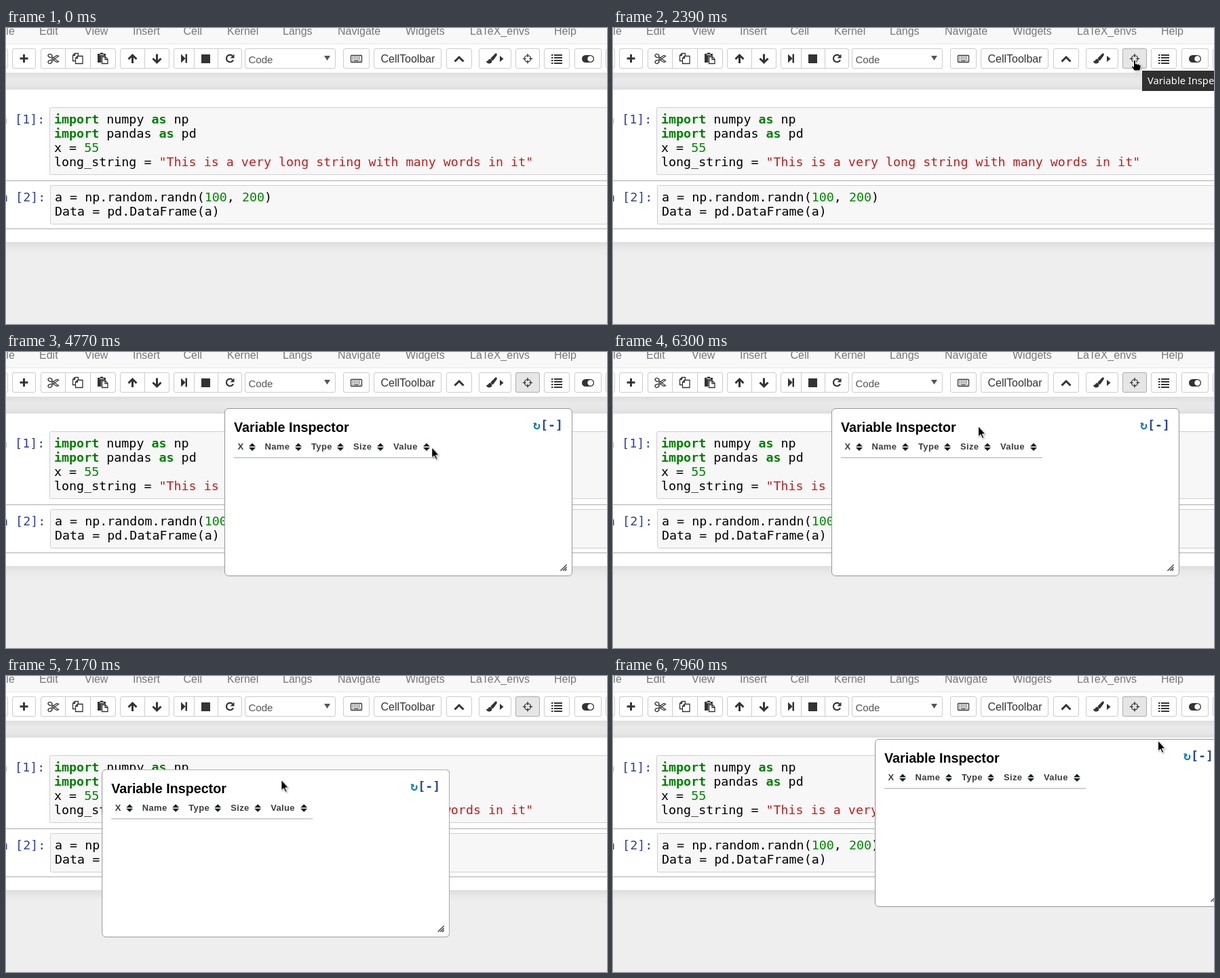
Recreate the animation shown at these times as an HTML page. Size 886x437 px, loop 8 s.

```html
<!DOCTYPE html>
<html lang="en">
<head>
<meta charset="utf-8">
<title>Notebook variable inspector</title>
<style>
html, body { margin: 0; width: 100%; height: 100%; overflow: hidden; background: #eee; }
.stage { position: relative; width: 886px; height: 437px; overflow: hidden; background: #eee; }
.stage > * { position: absolute; }
.sheet { left: -30px; right: -30px; background: #fff; box-shadow: 0 0 16px 1px rgba(87, 87, 87, .2); }
.header { top: -10px; height: 76px; }
.notebook { top: 91px; height: 225px; }
svg { left: 0; top: 0; display: block; overflow: visible; }
text { white-space: pre; }

.menu { font: 16px "Liberation Sans", Arial, sans-serif; fill: #777; }
.label { font: 16px "Liberation Sans", Arial, sans-serif; fill: #333; }
.code { font: 18.33px "DejaVu Sans Mono", monospace; fill: #000; }
.prompt { fill: #303f9f; }
.key { fill: #008000; font-weight: bold; }
.num { fill: #008800; }
.str { fill: #ba2121; }
.box { fill: #f7f7f7; stroke: #cfcfcf; }
.btn { fill: #fff; stroke: #ccc; }
.icon { fill: #333; }
.line { fill: none; stroke: #333; stroke-width: 1.3; }
.bold { fill: none; stroke: #333; stroke-width: 3; }

.panel { left: 0; top: 0; width: 513px; height: 248px; box-sizing: border-box; overflow: hidden;
  background: #fff; border: 1px solid #959595; border-radius: 6px;
  animation: drag 8s linear infinite, grow 8s linear infinite; }
.panel svg { position: absolute; left: -1px; top: -1px; }
.title { font: bold 19.7px "Liberation Sans", Arial, sans-serif; }
.head { font: bold 13px "Liberation Sans", Arial, sans-serif; letter-spacing: .35px; fill: #3d3d3d; }
.tools { font: bold 18.33px "DejaVu Sans Mono", monospace; fill: #29479f; }

.cursor { animation: point 8s linear infinite; }
.arrow { animation: arrow 8s step-end infinite; }
.hand { animation: hand 8s step-end infinite; }
.hover { animation: hover 8s step-end infinite; }
.tip { animation: tip 8s step-end infinite; }
.editing { animation: editing 8s step-end infinite; }
.tip text { font: 14.7px "Noto Sans", "Open Sans", sans-serif; fill: #fff; }

@keyframes arrow {
  0%, 20.75% { visibility: hidden; }
  10.25%, 57.625% { visibility: visible; }
}
@keyframes hand {
  0%, 57.625% { visibility: hidden; }
  20.75% { visibility: visible; }
}
@keyframes hover {
  0% { visibility: hidden; }
  20.75% { visibility: visible; }
}
@keyframes tip {
  0%, 47.875% { visibility: hidden; }
  29.875% { visibility: visible; }
}
@keyframes editing {
  0%, 47.875% { visibility: hidden; }
  47.375% { visibility: visible; }
}
@keyframes point {
  0%, 10.25% { transform: translate(675px, 269px); }
  12% { transform: translate(686px, 243px); }
  14% { transform: translate(707px, 188px); }
  16.5% { transform: translate(732px, 113px); }
  18.25% { transform: translate(742px, 83px); }
  20.25% { transform: translate(756px, 64px); }
  20.75% { transform: translate(761px, 57px); }
  23.25%, 57.125% { transform: translate(769px, 47px); }
  57.625% { transform: translate(762px, 63px); }
  58.6% { transform: translate(705px, 108px); }
  59.625% { transform: translate(629px, 140px); }
  61.5% { transform: translate(358px, 181px); }
  64% { transform: translate(805px, 148px); }
  66.75% { transform: translate(524px, 103px); }
  67.875%, 74.75% { transform: translate(525px, 102px); }
  78.75%, 80% { transform: translate(538px, 109px); }
  83% { transform: translate(480px, 126px); }
  86.8% { transform: translate(353px, 164px); }
  88.4% { transform: translate(357px, 164px); }
  89.625% { transform: translate(405px, 153px); }
  90.25% { transform: translate(422px, 149px); }
  93.6%, 96.4% { transform: translate(602px, 118px); }
  99.5%, 100% { transform: translate(803px, 95px); }
}
@keyframes drag {
  0%, 80.5% { transform: translate(322px, 83px); }
  83.7% { transform: translate(264px, 100px); }
  87.5% { transform: translate(137px, 138px); }
  88.9% { transform: translate(136px, 138px); }
  89.625% { transform: translate(140px, 138px); }
  90.25%, 90.8% { transform: translate(201px, 126px); }
  94.25%, 100% { transform: translate(386px, 93px); }
}
@keyframes grow {
  0%, 48.5% { width: 0; height: 0; opacity: 0; animation-timing-function: ease-in-out; }
  53.5%, 100% { width: 513px; height: 248px; opacity: 1; }
}
</style>
</head>
<body>
<div class="stage">
  <div class="sheet notebook"></div>
  <div class="sheet header"></div>

  <svg width="886" height="437">
    <path fill="#f8f8f8" d="M0 0h886v23H0z"/>
    <path fill="#e7e7e7" d="M0 23h886v1H0z"/>
    <g class="menu">
      <text x="-13" y="10">File</text><text x="49" y="10">Edit</text>
      <text x="116" y="10">View</text><text x="187" y="10">Insert</text>
      <text x="261.5" y="10">Cell</text><text x="326" y="10">Kernel</text>
      <text x="408" y="10">Langs</text><text x="489" y="10">Navigate</text>
      <text x="589" y="10">Widgets</text><text x="684" y="10">LaTeX_envs</text>
      <text x="808" y="10">Help</text>
    </g>

    <!-- toolbar buttons -->
    <g class="btn">
      <rect x="-30.5" y="30.5" width="33" height="29" rx="2.5"/>
      <rect x="9.5" y="30.5" width="34" height="29" rx="2.5"/>
      <rect x="51.5" y="30.5" width="110" height="29" rx="2.5"/>
      <rect x="168.5" y="30.5" width="72" height="29" rx="2.5"/>
      <rect x="247.5" y="30.5" width="100" height="29" rx="2.5"/>
      <path d="M87.5 30v30M124.5 30v30M204.5 30v30M277.5 30v30M312.5 30v30"/>
      <rect x="352.5" y="30.5" width="133" height="29" rx="2.5"/>
      <rect x="497.5" y="30.5" width="38" height="29" rx="2.5"/>
      <rect x="542.5" y="30.5" width="99" height="29" rx="2.5"/>
      <rect x="649.5" y="30.5" width="37" height="29" rx="2.5"/>
      <rect x="697.5" y="30.5" width="47" height="29" rx="2.5"/>
      <rect x="751.5" y="30.5" width="35" height="29" rx="2.5"/>
      <rect x="793.5" y="30.5" width="37" height="29" rx="2.5"/>
      <rect x="838.5" y="30.5" width="39" height="29" rx="2.5"/>
      <rect x="884.5" y="30.5" width="40" height="29" rx="2.5"/>
    </g>
    <rect class="hover" x="751.5" y="30.5" width="35" height="29" rx="2.5" fill="#e6e6e6" stroke="#adadad"/>

    <text class="label" x="552.5" y="51">CellToolbar</text>
    <text class="label" x="357.5" y="52" style="font-size:15px;fill:#555">Code</text>
    <path fill="#555" d="M469 41h9l-4.5 7z"/>

    <!-- toolbar icons -->
    <path class="bold" d="M20.500 45h12M26.500 39v12"/>
    <g class="line">
      <ellipse cx="65" cy="41" rx="3" ry="2.300" transform="rotate(25 65 41)"/>
      <ellipse cx="65" cy="50" rx="3" ry="2.300" transform="rotate(-25 65 50)"/>
      <path d="M67.500 42.500L77.500 49.500l-2.500 1L67 45.500M67.500 48.500L77.500 41.500l-2.500-1L67 45.500"/>
      <path d="M102.500 48.500h-4v-8l3-3h5v4M98.500 40.500h3v-3M105.500 41.500h7.500v11h-10.500v-8zM102.500 44.500h3v-3"/>
      <path d="M141.500 42.500h5l3.500 3.500v6.500h-8.500zM146 42.500v4h4"/>
    </g>
    <path class="icon" d="M135 38h3.500l1-1.500h3l1 1.500h3.500v3.500h-6.500v9.500h-5.500z"/>
    <path fill="#fff" d="M138 39h6v1h-6z"/>
    <g class="bold">
      <path d="M186.500 52v-11M180.500 46l6-6 6 6"/>
      <path d="M222.500 38.500v11M216.500 45l6 6 6-6"/>
      <path d="M661.500 49.500l6.500-6.500 6.500 6.500"/>
      <path stroke-width="2.200" d="M334 41.200a5.300 5.300 0 1 0 1 6"/>
    </g>
    <path class="icon" d="M258 38.500l6.500 6.500v-6.500h2.500v13h-2.500V45l-6.500 6.500z"/>
    <path class="icon" d="M288 39h13v13h-13z"/>
    <path class="icon" d="M336.500 38.500v6h-6z"/>
    <rect class="line" x="508.500" y="40.500" width="16" height="10" rx="1"/>
    <path class="line" stroke-dasharray="1.500 1" d="M510.500 43.200h12.500M510.500 45.600h12.500"/>
    <path class="line" d="M513 48.300h7M510.500 48.300h1.300M521.300 48.300h1.300"/>
    <path class="icon" d="M723 37.500q1.500 1 .5 3l-5 7q-1.500 1-3-.5t-.5-3l6-6q1-1 2-.5zM714 45.500l2.500 3q0 4-4.500 4-3.500 0-4-4 2 1 3-1 1-2 3-2zM728 41l5.500 4.500L728 50z"/>
    <circle class="line" cx="769" cy="45.300" r="4.700" stroke-width="1.600"/>
    <path class="line" stroke-width="1.600" d="M769 38v5M769 47.500v5M761.800 45.300h5M771.200 45.300h5"/>
    <path class="line" style="stroke-width:2" d="M804 40h2.500M804 44h2.500M804 48h2.500M804 52h2.500M808 40h12M808 44h12M808 48h12M808 52h12"/>
    <rect class="icon" x="849" y="40" width="18" height="11" rx="5.500"/>
    <circle cx="861.500" cy="45.500" r="4.200" fill="#fff"/>

    <!-- cells -->
    <rect class="box" x="64.5" y="117.5" width="840" height="99" rx="2"/>
    <rect class="box" x="65.5" y="232.5" width="840" height="57" rx="2"/>
    <path fill="#ababab" d="M0 225h886v1H0zM0 296h886v1H0z"/>
    <g class="editing">
      <path fill="#88a088" d="M0 225h886v1H0z"/>
      <path fill="#66bb6a" d="M0 296h886v1H0z"/>
      <path fill="#82c882" d="M348 240h33v20h-33z"/>
      <path d="M359 240h1v20h-1z"/>
    </g>
    <g class="code">
      <text class="prompt" x="-20" y="141">In [1]:</text>
      <text class="prompt" x="-19" y="256">In [2]:</text>
      <text x="71" y="141"><tspan class="key">import</tspan> numpy <tspan class="key">as</tspan> np</text>
      <text x="71" y="162"><tspan class="key">import</tspan> pandas <tspan class="key">as</tspan> pd</text>
      <text x="71" y="183">x = <tspan class="num">55</tspan></text>
      <text x="71" y="204">long_string = <tspan class="str">"This is a very long string with many words in it"</tspan></text>
      <text x="72" y="256">a = np.random.randn(<tspan class="num">100</tspan>, <tspan class="num">200</tspan>)</text>
      <text x="72" y="277">Data = pd.DataFrame(a)</text>
    </g>
    <g class="tip">
      <path fill="#303030" d="M780 63h110v30h-110z"/>
      <text x="788" y="83">Variable Inspector</text>
    </g>
  </svg>

  <div class="panel">
    <svg width="513" height="248">
      <defs><path id="sort" fill="#12211f" d="M0 5l5-5 5 5zM0 6.500h10l-5 5z"/></defs>
      <text class="title" x="14" y="35">Variable Inspector</text>
      <text class="tools" x="455" y="31"><tspan fill="#0f7fae">↻</tspan>[-]</text>
      <g class="head">
        <text x="19.500" y="61">X</text><text x="59.500" y="61">Name</text>
        <text x="128" y="61">Type</text><text x="190" y="61">Size</text>
        <text x="249" y="61">Value</text>
      </g>
      <use href="#sort" x="36" y="51.500"/><use href="#sort" x="104" y="51.500"/>
      <use href="#sort" x="166" y="51.500"/><use href="#sort" x="225" y="51.500"/>
      <use href="#sort" x="293" y="51.500"/>
      <path fill="#d0d0d0" d="M14 72h297v2H14z"/>
      <path fill="none" stroke="#444" stroke-width="1.500" d="M495.500 240l9-9M499 240l5.500-5.500M502 240l2.500-2.500"/>
    </svg>
  </div>

  <svg width="886" height="437">
    <g class="cursor" stroke="#fff" stroke-linejoin="round" style="filter:drop-shadow(1px 1px 1px rgba(0,0,0,.3))">
      <path class="arrow" d="M.5 .5v15.500l3.500-3.200 2.500 5.700 2.300-1-2.500-5.500h4.700z"/>
      <path class="hand" d="M-1.500 1.500q1.500-2 3 0v4.500q1.500-1 2.500.5 1.500-1 2.500.5 2-.5 2.500 1.500v3.500l-1.500 4h-8l-4-5.500q-.5-2 1.500-1.500l1.500 1.500z"/>
    </g>
  </svg>
</div>
</body>
</html>
```
